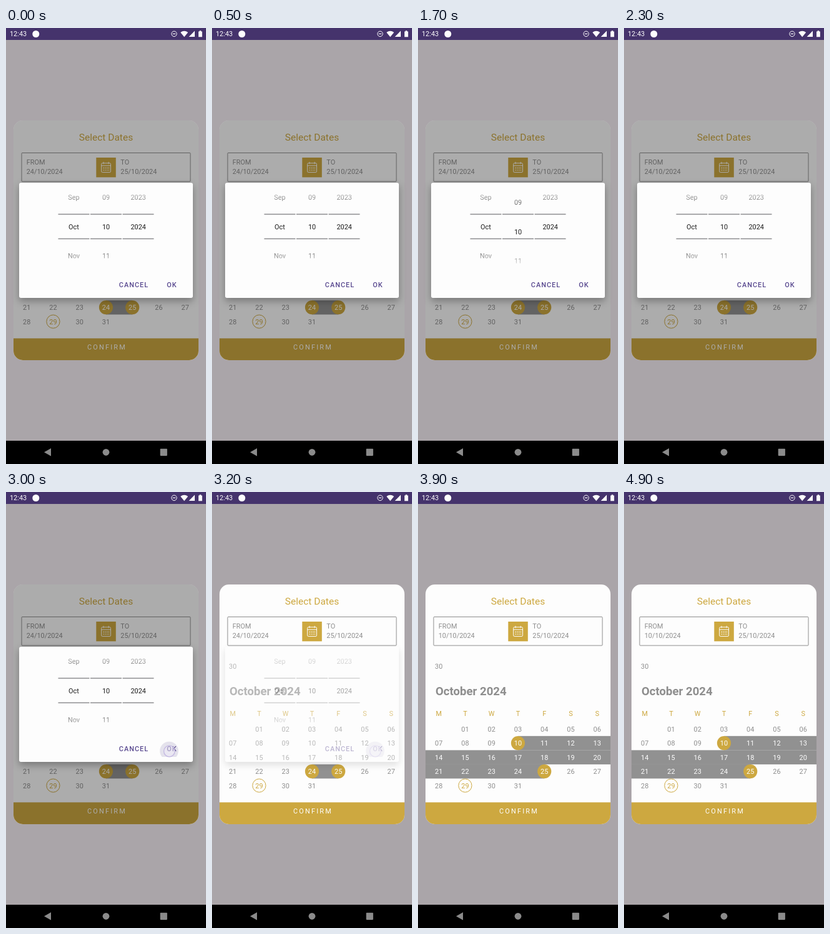
Write an HTML page that moves like this. It is 320 px wide and 693 px high and loops after 5000 ms.

```html
<!DOCTYPE html>
<html lang="en">
<head>
<meta charset="utf-8">
<title>Date range picker</title>
<style>
  html, body { margin: 0; width: 100%; height: 100%; overflow: hidden; background: #aaa5a9; }
  svg { display: block; width: 100vw; height: 100vh; }
  text { font: 10.9px Roboto, sans-serif; fill: #8e8e8e; }
  .mid { text-anchor: middle; }
  .gold { fill: #cda840; }
  .white { fill: #fdfdfd; }
  .title { font-size: 15.5px; }
  .month { font-size: 18.6px; font-weight: 700; }
  .confirm { letter-spacing: 2.2px; }
  .button { font-weight: 500; letter-spacing: 1px; fill: #58488f; }
  .wheel text { fill: #1c1c1c; }
  #dialog { filter: drop-shadow(0 5px 6px rgba(0, 0, 0, .3)); }
</style>
</head>
<body>
<svg viewBox="0 0 320 693" preserveAspectRatio="none">
  <defs>
    <clipPath id="cardClip"><rect x="12" y="147" width="296" height="381" rx="15"/></clipPath>
    <clipPath id="buttonClip"><rect x="240" y="394" width="40" height="27"/></clipPath>
    <linearGradient id="fade" gradientUnits="userSpaceOnUse" x1="0" y1="249" x2="0" y2="383">
      <stop offset="0" stop-color="#000"/>
      <stop offset=".35" stop-color="#fff"/>
      <stop offset=".65" stop-color="#fff"/>
      <stop offset="1" stop-color="#000"/>
    </linearGradient>
    <mask id="wheelMask" maskUnits="userSpaceOnUse" x="80" y="249" width="160" height="134" style="mask-type: luminance">
      <rect x="80" y="249" width="160" height="134" fill="url(#fade)" color-interpolation="sRGB"/>
    </mask>
  </defs>

  <rect width="320" height="693" fill="#aaa5a9"/>

  <g id="statusBar">
    <rect width="320" height="19" fill="#45336c"/>
    <text class="white" x="6" y="13.4">12:43</text>
    <circle class="white" cx="47.8" cy="9.5" r="5.5"/>
    <circle cx="269" cy="9.3" r="4.2" fill="none" stroke="#fdfdfd"/>
    <path d="M266.8 9.3h4.4" stroke="#fdfdfd" stroke-width="1.2"/>
    <path class="white" d="M279.2 7q6-4.6 12 0l-6 7.2zM302 4.6v9.4h-9.4zM308 5.4h1.6v-1.2h2.6v1.2h1.6v8.8h-5.8z"/>
  </g>

  <g clip-path="url(#cardClip)">
    <rect class="white" x="12" y="147" width="296" height="381"/>
    <text class="mid gold title" x="160" y="179">Select Dates</text>
    <rect x="25" y="198.5" width="270" height="45.5" rx="1" fill="none" stroke="#8e8e8e"/>
    <text x="32.7" y="217.4">FROM</text>
    <text id="fromDate" x="32.7" y="232.2"></text>
    <text x="183.3" y="217.4">TO</text>
    <text x="183.3" y="232.2">25/10/2024</text>
    <rect class="gold" x="144.3" y="206" width="31.5" height="31.3"/>
    <g fill="none" stroke="#fdfdfd">
      <rect x="152.7" y="214.8" width="14.8" height="14.6" rx="1.6"/>
      <path d="M152.7 218.8h14.8M156 212.8v3.4M164.2 212.8v3.4"/>
      <path d="M155.4 222.5h10M155.4 225.8h10" stroke-width="1.3" stroke-dasharray="1.5 1.3"/>
    </g>
    <text class="mid" x="33.2" y="281">30</text>
    <text class="month" x="28" y="323.2">October 2024</text>
    <g id="calendar"></g>
    <rect class="gold" x="12" y="493.3" width="296" height="35"/>
    <text class="mid white confirm" x="161.5" y="511">CONFIRM</text>
    <rect id="dim" x="12" y="147" width="296" height="381" opacity=".32"/>
  </g>

  <g id="dialog">
    <rect class="white" x="21" y="246" width="278" height="183" rx="3"/>
    <g id="wheels" class="wheel" mask="url(#wheelMask)"></g>
    <path d="M83.5 296h50m1.5 0h50m1.5 0h50M83.5 335h50m1.5 0h50m1.5 0h50" stroke="#58585c" stroke-width="1.2"/>
    <text class="button" x="180.8" y="411.6">CANCEL</text>
    <text class="button" x="257.3" y="411.6">OK</text>
    <g id="press">
      <g clip-path="url(#buttonClip)">
        <circle id="ripple" cx="261" cy="411.5" r="14.8" fill="#5a488f" fill-opacity=".15"/>
      </g>
      <circle cx="261.3" cy="412" r="8.8" fill="#f0ecf8" fill-opacity=".5" stroke="#c3b8e2" stroke-width="1.3"/>
    </g>
  </g>

  <g fill="#8b8b8b">
    <rect y="656" width="320" height="37" fill="#000"/>
    <path d="M61 674.3l11-6.2v12.4z"/>
    <circle cx="160" cy="674.3" r="5.4"/>
    <rect x="246.7" y="668.7" width="11.2" height="11.2" rx=".8"/>
  </g>
</svg>

<script>
const LOOP = 5000, STEP = 100;
const CLOSE = 3200, APPLY = 3300, PRESS = 2900;
const ROW_H = 22.5, WHEEL_PITCH = 46.5;

const $ = id => document.getElementById(id);
const pad = n => String(n).padStart(2, '0');
const colX = c => 33.2 + 42.25 * c;
const rowY = r => 376.6 + ROW_H * r;
const label = (x, y, s, cls = '') => `<text class="mid ${cls}" x="${x}" y="${y}">${s}</text>`;

// October 2024 starts on a Tuesday
const cell = day => ({ col: day % 7, row: Math.floor(day / 7) });

function calendarMarkup(from, to) {
  const a = cell(from), b = cell(to);
  let out = '';
  for (let r = a.row; r <= b.row; r++) {
    const left = r === a.row ? colX(a.col) : 12;
    const right = r === b.row ? colX(b.col) : 308;
    out += `<rect x="${left}" y="${rowY(r) - ROW_H / 2}" width="${right - left}" height="${ROW_H + .1}" fill="#919191"/>`;
  }
  for (const { col, row } of [a, b])
    out += `<circle class="gold" cx="${colX(col)}" cy="${rowY(row)}" r="11.1"/>`;
  [...'MTWTFSS'].forEach((s, i) => out += label(colX(i), 355.8, s, 'gold'));
  for (let day = 1; day <= 31; day++) {
    const { col, row } = cell(day);
    const cls = day >= from && day <= to ? 'white' : day === 29 ? 'gold' : '';
    out += label(colX(col), rowY(row) + 4, pad(day), cls);
  }
  const today = cell(29);
  return out + `<circle cx="${colX(today.col)}" cy="${rowY(today.row)}" r="10.6" fill="none" stroke="#cda840"/>`;
}

const wheels = [['Sep', 'Oct', 'Nov'], ['09', '10', '11'], ['2023', '2024', '']];
$('wheels').innerHTML = wheels.map((items, c) => '<g>' + items.map((s, i) =>
  label(108.5 + 51.6 * c, 319.8 + WHEEL_PITCH * (i - 1), s)).join('') + '</g>').join('');
const dayWheel = $('wheels').children[1];

// [time, value] tables with linear interpolation
const nudge = [[1300, 0], [1500, 5], [1700, 8], [1800, 2.5], [1900, 0]];
const rippleSize = [[PRESS, .7], [3000, 1]];
const dialogAlpha = [[3100, 1], [CLOSE, .38], [APPLY, 0]];

function valueAt(table, t) {
  const next = table.findIndex(([time]) => time > t);
  if (next < 0) return table[table.length - 1][1];
  if (next === 0) return table[0][1];
  const [t0, v0] = table[next - 1], [t1, v1] = table[next];
  return v0 + (v1 - v0) * (t - t0) / (t1 - t0);
}

let shownFrom;
function showFrom(day) {
  if (day === shownFrom) return;
  shownFrom = day;
  $('fromDate').textContent = `${pad(day)}/10/2024`;
  $('calendar').innerHTML = calendarMarkup(day, 25);
}

function render(t) {
  showFrom(t < APPLY ? 24 : 10);
  $('dim').style.display = t < CLOSE ? '' : 'none';
  $('dialog').style.opacity = valueAt(dialogAlpha, t);
  $('press').style.display = t < PRESS ? 'none' : '';
  $('ripple').setAttribute('r', 14.8 * valueAt(rippleSize, t));
  dayWheel.setAttribute('transform', `translate(0 ${valueAt(nudge, t)})`);
}

const start = performance.now();
function tick() {
  const t = (performance.now() - start) % LOOP;
  render(Math.floor(t / STEP) * STEP);
  requestAnimationFrame(tick);
}
tick();
</script>
</body>
</html>
```
